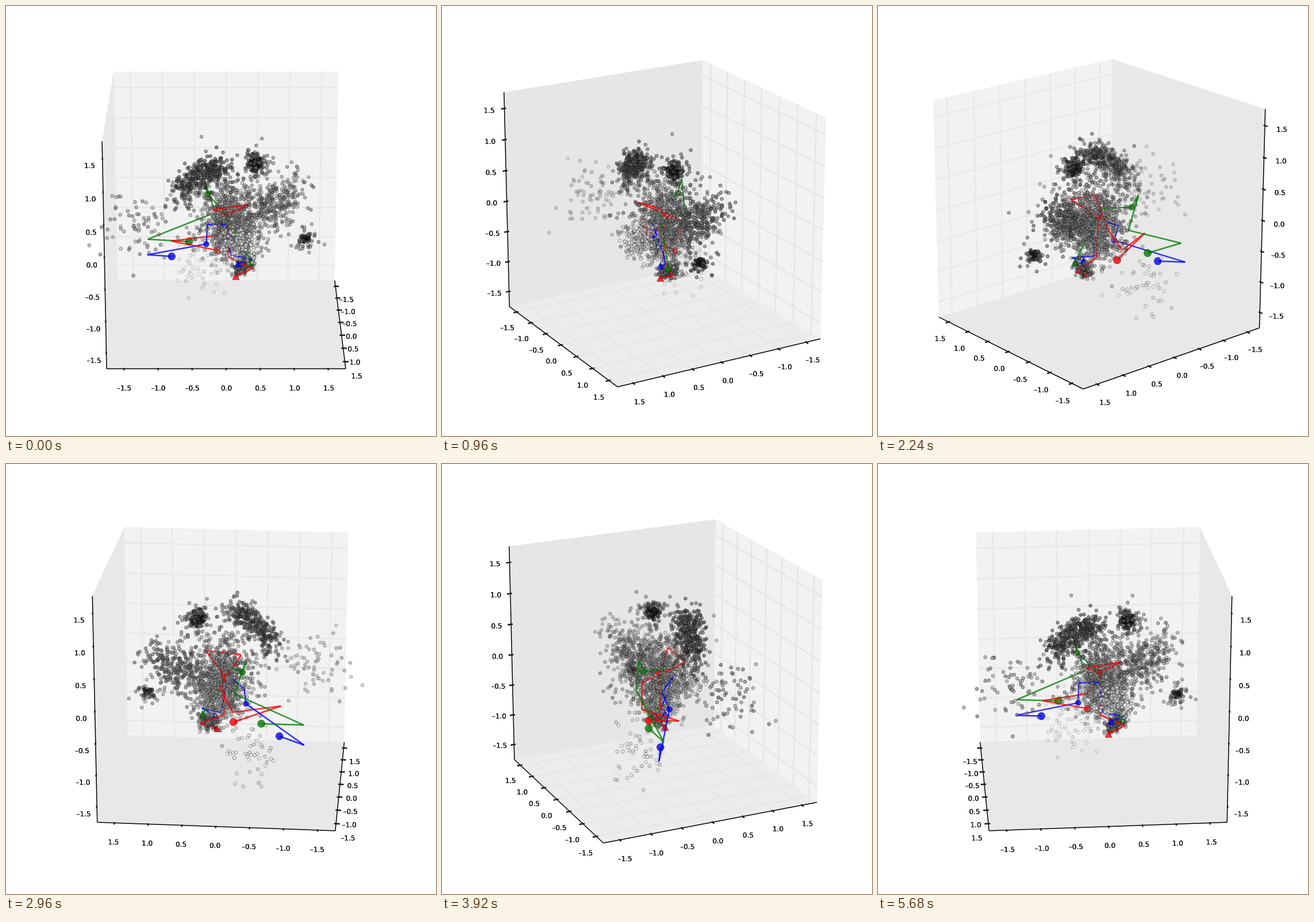
Recreate the animation shown at these times as an HTML page with a canvas. Size 748 px wide and 748 px high, loop 5760 ms.

```html
<!DOCTYPE html>
<html>
<head>
<meta charset="utf-8">
<style>
  html, body { margin: 0; height: 100%; overflow: hidden; background: #fff; }
  canvas { display: block; }
</style>
</head>
<body>
<canvas id="stage" width="748" height="748"></canvas>
<script>
const ctx = document.getElementById('stage').getContext('2d');
const ELEV = Math.PI / 9, DIST = 10, SCALE = 3868, CX = 383, CY = 364.5;
const BOX = 0.5208, RANGE = 3.375, STEP_MS = 80, STEPS = 72;
const TICKS = Array.from({ length: 7 }, (_, i) => i / 2 - 1.5);

let seed = 7;
function random() {
  seed = (seed * 16807) % 2147483647;
  return seed / 2147483647;
}
const gauss = () => Math.sqrt(-2 * Math.log(random())) * Math.cos(2 * Math.PI * random());

// Dots scattered around a curve; at(t) gives its point for t from 0 to 1.
const dots = [];
function scatter(count, spread, shade, at) {
  for (let i = 0; i < count; i++) {
    const level = Math.max(20, Math.min(245, shade + 16 * gauss()));
    dots.push({
      pos: at(random()).map(v => v + spread * gauss()),
      color: `rgb(${level},${level},${level})`
    });
  }
}
const blob = (count, spread, shade, ...center) => scatter(count, spread, shade, () => center);

function knot(count, ...center) {
  blob(count, 0.014, 35, ...center);
  blob(count * 0.7, 0.037, 100, ...center);
}

knot(115, 0.01, 0.127, 0.25);
knot(38, 0.017, 0.36, -0.106);
scatter(350, 0.032, 75, t => [0.12 - 0.08 * t, -0.02 - 0.19 * t, 0.26 - 0.15 * t * t]);
scatter(270, 0.045, 105, t => [-0.03 - 0.05 * t, 0.13 + 0.19 * t, -0.03 + 0.14 * t]);
scatter(150, 0.018, 100, t => [0.022 - 0.03 * t, 0.052 + 0.055 * t, -0.262 + 0.035 * t]);
scatter(700, 0.05, 155, t => [-0.01, 0.015, 0.05 - 0.21 * t]);
blob(420, 0.1, 112, 0, 0.04, 0.02);
blob(150, 0.036, 215, 0.15, 0.06, -0.08);
blob(70, 0.08, 140, 0.145, -0.38, 0);
blob(46, 0.065, 220, -0.17, -0.115, -0.32);

// Points in hundredths of the box; rest is the point with the inner marker.
const PATHS = [
  { rgb: '255,0,0', rest: 6, points: [
    [-8.5, -4, -20], [-3.4, -25, -13.5], [-12, -4, -14], [-9, 2, -3.5], [9, -6, 6],
    [7.5, 10, 8], [-1.4, 1, 0], [0, 1, -20], [1.5, 12, -25], [3.5, 4.4, -28]] },
  { rgb: '0,128,0', rest: 4, points: [
    [-14.5, -17, -18], [-16, -36, -17.4], [-15, -5, -4], [-16, -10, 11.7],
    [-13, -8.5, 5.6], [0, -2, 3], [3.3, 11, -21]] },
  { rgb: '0,0,255', rest: 2, points: [
    [-12.5, -25, -24.5], [-18.5, -36.4, -26], [-0.6, -9, -14], [-4, -8.5, -5.7],
    [5.3, 0, -2.3], [0, 2, -19], [5.2, 11.6, -19], [4, 5.4, -21.7]] }
];

function makeProjection(azim) {
  const ca = Math.cos(azim), sa = Math.sin(azim);
  const ce = Math.cos(ELEV), se = Math.sin(ELEV);
  return ([x, y, z]) => {
    const near = ca * x + sa * y;
    const depth = DIST - near * ce - z * se;
    return [CX + SCALE * (ca * y - sa * x) / depth,
            CY - SCALE * (z * ce - near * se) / depth, depth];
  };
}

function trace(points) {
  ctx.beginPath();
  for (const [x, y] of points) ctx.lineTo(x, y);
}

function strokeLine(points, width, color) {
  trace(points);
  ctx.lineWidth = width;
  ctx.strokeStyle = color;
  ctx.stroke();
}

const withAxis = (base, axis, value) => base.map((v, i) => i === axis ? value : v);

// Three panes and the grid; their greys merge at some angles.
function paneColors(azim) {
  const side = Math.sin(azim);
  if (side < -0.6 && Math.cos(azim) > 0.2) return Array(4).fill('#ebebeb');
  if (Math.abs(side) > 0.8) return ['#f2f2f2', '#e6e6e6', '#ececec', '#e6e6e6'];
  return ['#f2f2f2', '#e8e8e8', '#e8e8e8', '#e8e8e8'];
}

function drawBox(project, azim) {
  const back = [Math.cos(azim) >= 0 ? -BOX : BOX, Math.sin(azim) >= 0 ? -BOX : BOX, -BOX];
  const colors = paneColors(azim);
  const others = [[1, 2], [0, 2], [0, 1]];

  others.forEach(([j, k], axis) => {
    const front = withAxis(back, j, -back[j]);
    trace([back, front, withAxis(front, k, -back[k]), withAxis(back, k, -back[k])].map(project));
    ctx.fillStyle = colors[axis];
    ctx.fill();
  });

  others.forEach(([j, k], axis) => {
    for (const tick of TICKS) {
      const corner = withAxis(back, axis, tick / RANGE);
      strokeLine([withAxis(corner, j, -back[j]), corner, withAxis(corner, k, -back[k])].map(project),
        2.6, colors[3]);
    }
  });

  ctx.font = '12px "DejaVu Sans", sans-serif';
  ctx.textAlign = 'center';
  others.forEach(([dir], axis) => {
    const edge = withAxis(back, dir, -back[dir]);
    strokeLine([edge, withAxis(edge, axis, -edge[axis])].map(project), 1.5, '#000');
    const outward = Math.sign(edge[dir]) / 12;
    for (const tick of TICKS) {
      const at = withAxis(edge, axis, tick / RANGE);
      strokeLine([withAxis(at, dir, edge[dir] - 0.1 * outward),
                  withAxis(at, dir, edge[dir] + 0.2 * outward)].map(project), 2.5, '#1a1a1a');
      const [x, y] = project(withAxis(edge.map(v => v * 1.1), axis, tick / RANGE));
      const label = (tick < 0 ? '–' : '') + Math.abs(tick).toFixed(1);
      ctx.fillStyle = '#000';
      // twice, for heavier strokes
      for (let i = 0; i < 2; i++) ctx.fillText(label, x + 0.5, Math.round(y + 10));
    }
  });
}

function drawMark([x, y], shape, r, rgb) {
  ctx.beginPath();
  if (shape === 'circle') {
    ctx.arc(x, y, r, 0, 2 * Math.PI);
  } else {
    ctx.moveTo(x, y - r);
    ctx.lineTo(x + r, y + r);
    ctx.lineTo(x - r, y + r);
    ctx.closePath();
  }
  ctx.fillStyle = `rgba(${rgb},0.8)`;
  ctx.fill();
  ctx.lineWidth = 0.8;
  ctx.strokeStyle = 'rgba(0,0,0,0.5)';
  ctx.stroke();
}

function drawDot([x, y, depth], color) {
  ctx.globalAlpha = Math.max(0.3, Math.min(0.7, 0.48 + (DIST - depth) * 0.7));
  ctx.beginPath();
  ctx.arc(x, y, 2.9, 0, 2 * Math.PI);
  ctx.fillStyle = color;
  ctx.fill();
  ctx.lineWidth = 0.65;
  ctx.strokeStyle = '#000';
  ctx.stroke();
  ctx.globalAlpha = 1;
}

function drawData(project) {
  const items = dots.map(dot => {
    const p = project(dot.pos);
    return { depth: p[2], draw: () => drawDot(p, dot.color) };
  });
  for (const { rgb, points, rest } of PATHS) {
    const line = points.map(p => project(p.map(v => v / 100)));
    for (let i = 1; i < line.length; i++) {
      const pair = [line[i - 1], line[i]];
      items.push({
        depth: (pair[0][2] + pair[1][2]) / 2 - 0.04,
        draw: () => strokeLine(pair, 2.5, `rgba(${rgb},0.8)`)
      });
    }
    const addMark = (p, shape, r) =>
      items.push({ depth: p[2] - 0.06, draw: () => drawMark(p, shape, r, rgb) });
    addMark(line[0], 'circle', 6.5);
    addMark(line[rest], 'circle', 5);
    addMark(line[line.length - 1], 'triangle', 6);
  }
  items.sort((a, b) => b.depth - a.depth).forEach(item => item.draw());
}

let shown = -1;
function render() {
  const step = Math.floor(performance.now() / STEP_MS) % STEPS;
  if (step !== shown) {
    shown = step;
    const azim = step / STEPS * 2 * Math.PI;
    const project = makeProjection(azim);
    ctx.fillStyle = '#fff';
    ctx.fillRect(0, 0, 748, 748);
    drawBox(project, azim);
    drawData(project);
  }
  requestAnimationFrame(render);
}
render();
</script>
</body>
</html>
```
